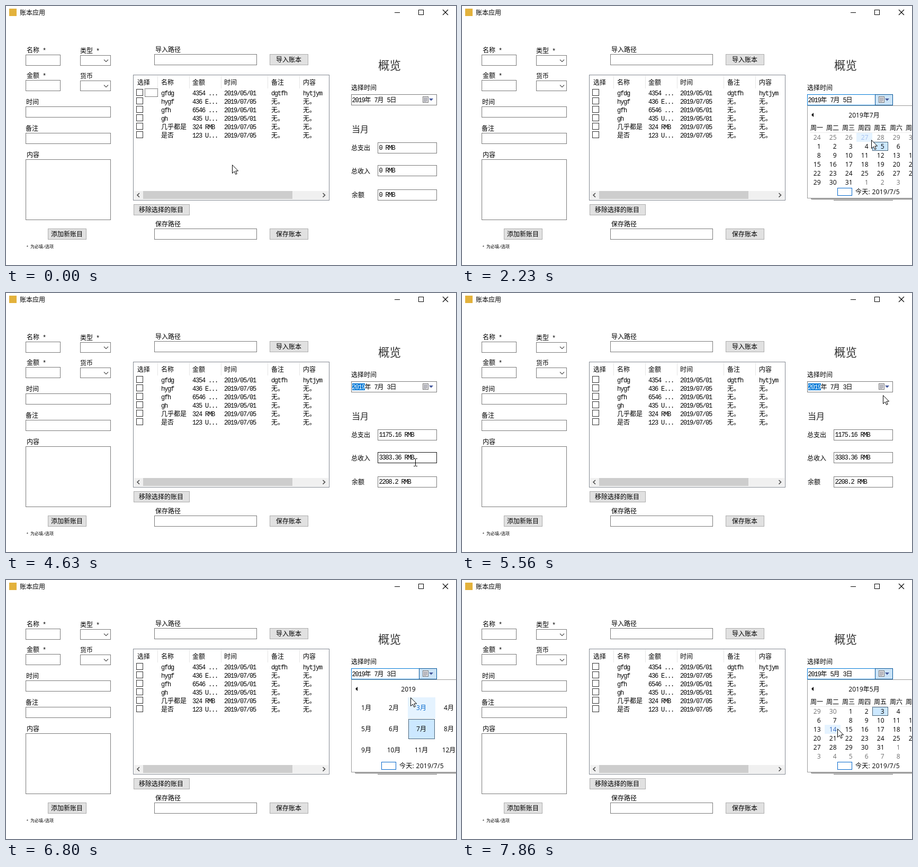
An HTML page for the animation above (8 s loop, 850 by 490 pixels).

```html
<!DOCTYPE html>
<html lang="zh-CN">
<head>
<meta charset="utf-8">
<title>账本应用</title>
<style>
  html, body { margin: 0; width: 100%; height: 100%; overflow: hidden; background: #fff; }
  svg { display: block; width: 850px; height: 490px; }
  text { white-space: pre; font-family: "Noto Sans CJK SC", "Noto Sans CJK", sans-serif; }
  .mono { font: 12px "Liberation Mono", monospace; letter-spacing: -1.2px; }
  .note .mono { font-size: 8px; letter-spacing: -.8px; }
  .ui { font: 12px "Open Sans", "Noto Sans CJK SC", "Noto Sans CJK", sans-serif; }
  .thin { font-family: "Noto Sans CJK SC Light", "Noto Sans CJK SC", "Noto Sans CJK", sans-serif; font-weight: 200; }
  rect, .crisp { shape-rendering: crispEdges; }
  .click { fill: #f0ec28; opacity: .8; }
</style>
</head>
<body>
<svg viewBox="0 0 850 490"><g id="base"></g><g id="live"></g></svg>
<script>
const LOOP = 8000;
const GRAY = '#7a7a7a', BLUE = '#0066cc', PALE = '#e5f3ff', PICK = '#cce8ff';
const DOTS = 'stroke-dasharray="1 1" stroke-dashoffset=".5"';

// Bursts of motion: first step, last step, number of steps
const BURSTS = [
  [450, 1220, 11], [1600, 1770, 3], [1920, 2610, 10], [2880, 3540, 10],
  [3710, 4090, 6], [4240, 4240, 1], [4400, 4400, 1], [4550, 4630, 2],
  [4950, 5720, 11], [5790, 6190, 6], [6340, 6650, 5], [6800, 7570, 11], [7640, 7860, 4]
];

// Pointer path: time, x, y
const PATH = [
  [373, 427, 300], [600, 470, 285], [840, 620, 225], [1060, 770, 186], [1220, 808, 182],
  [1843, 808, 182], [2227, 773, 253], [2610, 735, 286],
  [2807, 735, 286], [3027, 743, 291], [3247, 782, 255], [3540, 731, 267],
  [3862, 731, 267], [4090, 775, 318], [4470, 775, 318], [4630, 773, 320],
  [4873, 773, 320], [5200, 780, 262], [5500, 796, 190], [5720, 800, 178],
  [5867, 800, 178], [6190, 766, 204], [6650, 766, 204], [6800, 764, 222],
  [7030, 720, 260], [7185, 690, 281], [7416, 690, 281], [7860, 709, 281]
];

const CLICKS = [[1600, 1760], [3710, 3850], [5790, 5930], [6340, 6480], [7180, 7330]];

const within = (t, a, b) => t >= a && t < b;
const ramp = (t, a, b) => Math.min(1, Math.max(0, (t - a) / (b - a)));

function snap(t) {
  const burst = BURSTS.filter(b => b[0] <= t).pop();
  if (!burst) return 0;
  const [start, end, n] = burst;
  if (n === 1) return start;
  const dt = (end - start) / (n - 1);
  return start + Math.min(n - 1, Math.floor((t - start) / dt + .02)) * dt;
}

function pointer(t) {
  const i = PATH.findIndex(p => p[0] > t);
  if (i === 0) return PATH[0].slice(1);
  if (i < 0) return PATH[PATH.length - 1].slice(1);
  const [a, b] = [PATH[i - 1], PATH[i]];
  const k = ramp(t, a[0], b[0]);
  return [1, 2].map(j => Math.round(a[j] + (b[j] - a[j]) * k));
}

// Drawing helpers; boxes are given by their outer pixel edges
const box = (x, y, r, b, stroke = GRAY, fill = '#fff', more = '') =>
  `<rect x="${x + .5}" y="${y + .5}" width="${r - x - 1}" height="${b - y - 1}" stroke="${stroke}" fill="${fill}" ${more}/>`;
const fill = (x, y, r, b, color) =>
  `<rect x="${x}" y="${y}" width="${r - x}" height="${b - y}" fill="${color}"/>`;
const path = (d, stroke, more = '') =>
  `<path d="${d}" stroke="${stroke}" fill="none" ${more}/>`;
const solid = (d, color) => `<path d="${d}" fill="${color}"/>`;

// Latin at half width, Chinese at full width; cy is the middle of the line
function label(x, cy, s, size = 12, color = '#000', cls = '') {
  const runs = s.match(/[\x00-\x7f]+|[^\x00-\x7f]+/g).map(r =>
    `<tspan${r.charCodeAt(0) < 128 ? ' class="mono"' : ''}>${r}</tspan>`).join('');
  const y = Math.round(cy + size * .38 + .2);
  return `<text class="${cls}" x="${x}" y="${y}" font-size="${size}" fill="${color}">${runs}</text>`;
}
const ui = (x, cy, s, anchor = 'start', color = '#000', more = '') =>
  `<text class="ui" x="${x}" y="${cy + 4.5}" text-anchor="${anchor}" fill="${color}" ${more}>${s}</text>`;
const button = (x, y, r, tx, s) =>
  box(x, y, r, y + 21, '#adadad', '#e1e1e1') + label(tx, y + 10.5, s);
const combo = (x, y) => box(x, y, x + 58, y + 20) +
  path(`M${x + 45} ${y + 8.5}l4 4l4 -4`, '#505050', 'stroke-width="1.1"');

function listView() {
  const cols = [248, 293, 352, 412, 501, 561];
  const rows = [
    ['gfdg', '4354 ...', '2019/05/01', 'dgtfh', 'hytjym'],
    ['hygf', '436 E...', '2019/07/05', '无。', '无。'],
    ['gfh', '6546 ...', '2019/05/01', '无。', '无。'],
    ['gh', '435 U...', '2019/05/01', '无。', '无。'],
    ['几乎都是', '324 RMB', '2019/07/05', '无。', '无。'],
    ['是否', '123 U...', '2019/07/05', '无。', '无。']
  ];
  let s = box(240, 130, 611, 368, '#828790');
  ['选择', '名称', '金额', '时间', '备注', '内容'].forEach((h, i) => s += label(cols[i], 144, h));
  [286, 346, 406, 494, 554].forEach(x => s += fill(x, 132, x + 1, 156, '#e5e5e5'));
  rows.forEach((row, r) => {
    s += box(246, 157 + 16 * r, 259, 170 + 16 * r, '#333');
    row.forEach((c, i) => s += label(cols[i + 1], 164 + 16 * r, c));
  });
  return s + fill(242, 350, 609, 366, '#f0f0f0') + fill(259, 350, 541, 365, '#cdcdcd') +
    path('M252 354l-4 3.8l4 3.8M598.5 354l4 3.8l-4 3.8', '#505050', 'stroke-width="1.6"');
}

function base() {
  return fill(6, 5, 20, 19, '#e3b23c') + ui(26, 12.5, '账本应用') +
    path('M734 12.5H744', '#000', 'class="crisp"') + box(779, 7, 789, 17, '#000') +
    path('M825 7l10 10M835 7l-10 10', '#000', 'stroke-width="1.1"') +
    label(39, 83.5, '名称 *') + box(37, 92, 103, 113) +
    label(140, 84.5, '类型 *') + combo(140, 93) +
    label(39, 131.5, '金额 *') + box(37, 140, 103, 161) +
    label(140, 132, '货币') + combo(140, 141) +
    label(38, 181.5, '时间') + box(37, 190, 198, 211) +
    label(37, 231.5, '备注') + box(37, 240, 198, 261) +
    label(39, 281.5, '内容') + box(37, 290, 198, 405) +
    button(79, 421, 152, 85, '添加新账目') + label(38, 455, '* 为必填/选项', 8, '#000', 'note') +
    label(282, 82, '导入路径') + box(280, 91, 474, 112) + button(498, 91, 571, 510, '导入账本') +
    listView() + button(241, 375, 347, 251, '移除选择的账目') +
    label(282, 412, '保存路径') + box(280, 421, 474, 442) + button(498, 421, 571, 510, '保存账本') +
    label(703, 112, '概览', 21.5, '#333', 'thin') + label(652, 154, '选择时间') +
    label(653, 233, '当月', 16, '#222', 'thin') +
    label(652, 268, '总支出') + label(652, 312, '总收入') + label(653, 357, '余额');
}

function picker(month, day, open, hot, marked) {
  let s = box(652, 167, 814, 188, open ? '#0078d7' : GRAY);
  if (hot) s += box(780, 167, 814, 188, '#005499', '#cce4f7');
  if (marked) s += fill(654, 171, 678, 184, '#0078d7');
  s += label(653.5, 177.5, '2019', 12, marked ? '#fff' : '#000') +
    label(677.5, 177.5, `年 ${month}月 ${day}日`);
  s += box(787, 171, 798, 183, '#777', '#e4e4e8') +
    path('M789 174.5h7M789 176.5h7M789 178.5h7M789 180.5h5M790.5 173v8M793.5 173v8', '#a0a0a8', 'class="crisp"');
  return s + solid('M799 175h8l-4 4.5z', '#45589c');
}

const chosen = (x, y, r, b) => box(x, y, r, b, '#90c8f6', PICK) + box(x, y, r, b, '#000', 'none', DOTS);

function dayView(month, day, mx, my) {
  const lead = (new Date(2019, month - 1, 1).getDay() + 6) % 7 || 7;
  let s = ui(759.5, 206.5, `2019年${month}月`, 'middle') + fill(658, 239, 850, 240, '#ebebeb');
  [...'一二三四五六日'].forEach((d, c) => s += ui(658 + 30 * c, 230.5, '周' + d));
  for (let i = 0; i < 42; i++) {
    const date = new Date(2019, month - 1, 1 - lead + i), n = date.getDate();
    const x = 655 + 30 * (i % 7), y = 240 + 17 * Math.floor(i / 7);
    const inside = date.getMonth() === month - 1;
    const hover = within(mx, x, x + 30) && within(my, y, y + 17);
    const today = inside && month === 7 && n === 5;
    let color = inside ? '#000' : '#707070';
    if (inside && n === day) s += chosen(x, y, x + 30, y + 17);
    else if (hover) {
      s += fill(x, y, x + 30, y + 17, PALE);
      color = inside ? '#3568c0' : '#a3bff0';
    } else if (today) {
      s += box(x, y, x + 30, y + 17, BLUE, '#fff', 'rx="1"');
      color = BLUE;
    }
    s += ui(x + 22.5, y + 8.5, n, 'end', color);
  }
  return s;
}

function monthView(month, mx, my) {
  let s = ui(760, 206.5, '2019', 'middle');
  for (let i = 0; i < 12; i++) {
    const x = 655 + 52 * (i % 4), y = 222 + 40 * Math.floor(i / 4);
    const hover = within(mx, x, x + 52) && within(my, y, y + 40);
    if (i + 1 === month) s += chosen(x + 1, y + 1, x + 51, y + 39);
    else if (hover) s += fill(x, y, x + 52, y + 40, PALE);
    s += ui(x + 25.5, y + 19.5, i + 1 + '月', 'middle', hover ? BLUE : '#000');
  }
  return s;
}

function popup(t, month, day, mx, my) {
  const zoom = ramp(t, 6417, 6650) - ramp(t, 7340, 7640);
  let s = fill(659, 364, 850, 366, '#a0a0a0') + fill(661, 366, 850, 367, '#d8d8d8') +
    box(652, 188, 860, 364, '#9a9a9a') + solid('M664 202v8l-4 -4z', '#000');
  if (zoom < 1) s += `<g opacity="${1 - zoom}">${dayView(month, day, mx, my)}</g>`;
  if (zoom > 0) s += `<g opacity="${zoom}">${monthView(month, mx, my)}</g>`;
  return s + box(709, 344, 737, 359, BLUE, '#fff', 'rx="1"') +
    ui(743, 351.5, '今天: 2019/7/5', 'start', '#000', 'letter-spacing=".3"');
}

function scene(t) {
  const [mx, my] = pointer(t);
  const open = within(t, 1680, 3780) || t >= 5860;
  const picked = t >= 3780;
  const month = t >= 7335 ? 5 : 7, day = picked ? 3 : 5;
  const over = (x, y, r, b) => within(mx, x, r) && within(my, y, b);
  const inField = y => !open && over(702, y, 814, y + 21);
  const sums = picked ? ['1175.16 RMB', '3383.36 RMB', '2208.2 RMB'] : ['0 RMB', '0 RMB', '0 RMB'];
  let s = t < 1600 ? box(262, 156, 287, 172, '#000', 'none', DOTS) : '';

  s += picker(month, day, open, open || over(780, 167, 814, 188), picked && !open);
  [258, 301, 347].forEach((y, i) => {
    const fading = i === 0 && within(t, 3930, 4390);
    const edge = inField(y) ? '#171717' : fading ? (t < 4230 ? '#333' : '#5a5a5a') : GRAY;
    s += box(702, y, 814, y + 21, edge) + label(704.5, y + 9.5, sums[i]);
  });
  if (open) s += popup(t, month, day, mx, my);
  if (CLICKS.some(c => within(t, ...c))) s += `<circle class="click" cx="${mx + .5}" cy="${my + 1}" r="12.5"/>`;

  const beam = [258, 301, 347].some(inField);
  s += `<g transform="translate(${mx} ${my})">` + (beam
    ? path('M-3 -6.5h3M1 -6.5h3M.5 -6v13M-3 7.5h3M1 7.5h3', '#000', 'class="crisp"')
    : '<path d="M.5 .7V16.5L4.3 13L6.8 18.5L9.2 17.4L6.8 12H11.6Z" fill="#fff" stroke="#000"/>') + '</g>';
  return s;
}

const live = document.getElementById('live');
let shown = -1;
function frame(now) {
  const t = snap(now % LOOP);
  if (t !== shown) {
    live.innerHTML = scene(t);
    shown = t;
  }
  requestAnimationFrame(frame);
}
document.getElementById('base').innerHTML = base();
frame(performance.now());
</script>
</body>
</html>
```
